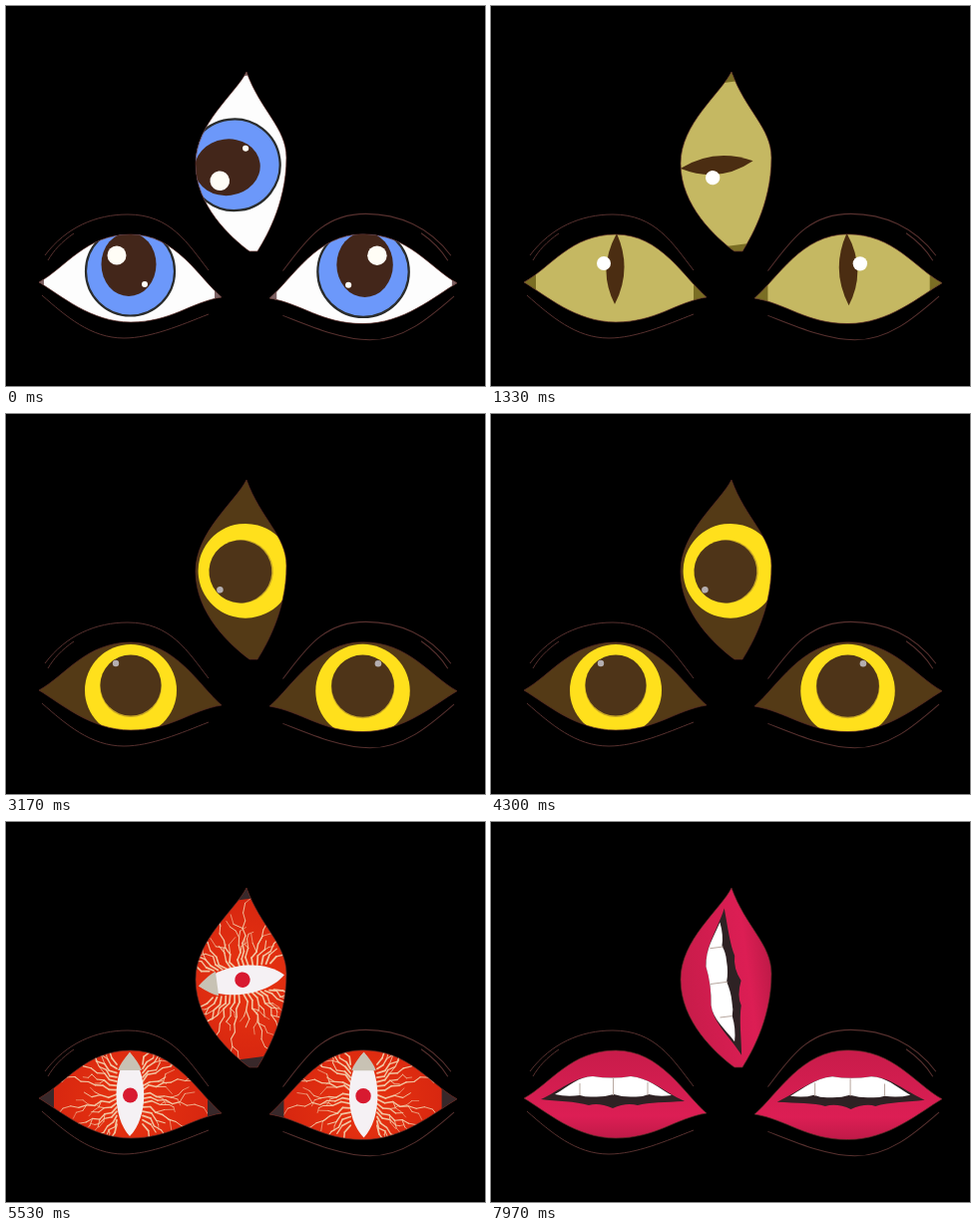
An HTML page for the animation above (8000 ms loop, 480 by 381 pixels).

```html
<!DOCTYPE html>
<html lang="en">
<head>
<meta charset="utf-8">
<title>Three eyes</title>
<style>
  html, body { margin: 0; height: 100%; overflow: hidden; background: #000; }
  svg { display: block; width: 100vw; height: 100vh; }
  .line { fill: none; stroke: #56302e; stroke-width: 1; }
  .rim { fill: none; stroke: #5a2a26; stroke-width: .7; }
</style>
</head>
<body>
<svg viewBox="0 0 480 381">
  <defs>
    <clipPath id="sideClip"><path class="sideLid"/></clipPath>
    <clipPath id="browClip"><path class="browLid"/></clipPath>
    <radialGradient id="redBall" gradientUnits="userSpaceOnUse" cx="124" cy="280" r="95">
      <stop offset="0" stop-color="#e83410"/><stop offset="1" stop-color="#d42410"/>
    </radialGradient>
    <linearGradient id="lipShade" gradientUnits="userSpaceOnUse" x1="0" y1="229" x2="0" y2="317">
      <stop offset="0" stop-color="#c81c4a"/><stop offset=".75" stop-color="#dc1e54"/><stop offset="1" stop-color="#c01a48"/>
    </linearGradient>

    <!-- Contents are drawn for the left eye and reused for the others -->
    <g id="blue">
      <rect x="20" y="200" width="210" height="140" fill="#fdfdfd"/>
      <path d="M20 200H38V340H20ZM209 200H230V340H209Z" fill="#7c6264"/>
      <circle cx="124.5" cy="266" r="44.5" fill="#6c98fa" stroke="#2a2c2c" stroke-width="2.2"/>
      <ellipse cx="123" cy="259" rx="27.5" ry="32" fill="#43261a"/>
      <circle cx="111" cy="250" r="9.5" fill="#fffdf6"/>
      <circle cx="139" cy="279" r="3" fill="#fffdf6"/>
    </g>
    <g id="cat">
      <rect x="20" y="200" width="210" height="140" fill="#c5b862"/>
      <path d="M20 200H45V340H20ZM203 200H230V340H203Z" fill="#7a6e24"/>
      <path d="M126 228Q142 264 124 299Q106 264 126 228Z" fill="#4b2d12"/>
      <circle cx="113" cy="258" r="7" fill="#fff"/>
    </g>
    <g id="ring">
      <rect x="20" y="200" width="210" height="140" fill="#543a16"/>
      <circle cx="125" cy="277" r="46" fill="#ffe01c"/>
      <circle cx="125" cy="273" r="31" fill="#c9a824"/>
      <circle cx="125" cy="272" r="30.5" fill="#4e3418"/>
      <circle cx="110" cy="250" r="3.2" fill="#b4aeb0"/>
    </g>
    <g id="red">
      <rect x="20" y="200" width="210" height="140" fill="url(#redBall)"/>
      <g id="veins" fill="none" stroke="#f2c4a0" stroke-linejoin="round" stroke-linecap="round"></g>
      <path d="M20 200H48V340H20ZM202 200H230V340H202Z" fill="#38282a"/>
      <path d="M124 231C143 252 143 296 124 315C106 296 106 252 124 231Z" fill="#f5f1f4"/>
      <path d="M124 231Q133 241 136 249H112Q115 241 124 231Z" fill="#c8c2b4"/>
      <circle cx="124.5" cy="274" r="7.5" fill="#d81a30"/>
    </g>
    <g id="lips">
      <rect x="20" y="200" width="210" height="140" fill="url(#lipShade)"/>
      <path d="M50 278C68 270 84 255 102 255Q122 258 140 255C160 257 173 270 194 280C175 281 158 281 147 284Q135 281 122 287Q108 281 98 284C85 280 65 280 50 278Z" fill="#2e2224"/>
      <path d="M64 273C78 265 88 255 102 255Q122 258 140 255C158 257 167 266 181 274Q168 276 158 273Q151 276 143 275.500Q132 276 123 273Q112 276 103 275.500Q95 276 89 274Q76 276 64 273Z" fill="#fff"/>
      <path d="M89 262V274M122.500 257V274M157 261V274" stroke="#b8a8a0" stroke-width="1"/>
    </g>

    <g id="sideEye">
      <path class="line" id="crease"/>
      <path class="line" id="fold"/>
      <path class="line" id="under"/>
      <g clip-path="url(#sideClip)"><use class="ball"/></g>
      <path class="rim sideLid"/>
    </g>
  </defs>

  <rect width="480" height="381"/>
  <use href="#sideEye"/>
  <use href="#sideEye" transform="matrix(-1.027 0 0 1.02 485.9 -4.8)"/>
  <path class="line" id="browFolds" d="M238 243C213 217 195 180 205 135M214 95L225 82M274 73Q286 91 294 115"/>
  <g clip-path="url(#browClip)">
    <g transform="translate(235 159) rotate(-97.500) scale(1.03) translate(-124 -272)"><use class="ball"/></g>
  </g>
  <path class="rim browLid"/>
</svg>
<script>
const LOOP = 8000, PERIOD = 2070, FIRST_BLINK = 333;
const SCENES = ['blue', 'cat', 'ring', 'red', 'lips'];

// Each shape has three poses: open, nearly shut, shut
const POSES = {
  '.sideLid': [
    'M33 277C60 262 80 229 125 229C170 229 193 272 216 292C185 297 165 317 125 317C85 317 55 290 33 277Z',
    'M34 286C65 285 95 284 125 285C160 286 190 296 214 299C185 304 165 316 125 316C85 316 55 301 34 286Z',
    'M36 292C60 306 85 317 125 317C165 317 190 306 213 302C190 306 165 317 125 317C85 317 60 306 36 292Z'],
  '.browLid': [
    'M241 66C230 88 190 118 190 158C190 200 225 232 244 246L252 246C258 236 281 200 281 152C281 122 255 105 241 66Z',
    'M250 84C246 110 247 130 248 158C249 190 252 220 256 243L258 243C270 220 280 195 280 155C280 128 270 120 250 84Z',
    'M257 95C272 120 279 130 279 158C279 195 268 222 260 240L260 240C268 222 279 195 279 158C279 130 272 120 257 95Z'],
  '#crease': [
    'M39 250C60 222 90 209 122 209C165 209 182 238 203 265',
    'M42 256C66 234 95 221 122 221C170 222 174 240 200 271',
    'M43 260C66 240 95 229 122 229C166 230 176 248 199 275'],
  '#fold': [
    'M42 255C48 245 55 237 68 228',
    'M43 266C75 242 112 232 151 245',
    'M43 272C75 252 112 243 155 254'],
  '#under': [
    'M36 290C60 311 85 333 118 333C145 333 175 320 203 309',
    'M40 302C65 320 95 339 128 339C155 339 175 330 201 318',
    'M41 306C65 323 95 342 128 342C155 342 175 333 201 321']
};

const $$ = selector => document.querySelectorAll(selector);

function blend(poses, level) {
  const from = Math.min(1, Math.floor(level)), k = level - from;
  const next = poses[from + 1].match(/[\d.]+/g);
  let i = 0;
  return poses[from].replace(/[\d.]+/g, n => (+n + (next[i++] - n) * k).toFixed(2));
}

function drawVeins() {
  let seed = 11, markup = '';
  const random = () => (seed = seed * 16807 % 2147483647) / 2147483647;
  const vein = (x, y, angle, length, width) => {
    const steps = Math.max(2, Math.round(length / 8));
    let previous = `${x} ${y}`;
    for (let i = 0; i < steps; i++) {
      const bend = angle + (i % 2 ? 1 : -1) * (0.1 + random() * 0.4);
      x += Math.cos(bend) * length / steps;
      y += Math.sin(bend) * length / steps;
      const point = `${x.toFixed(1)} ${y.toFixed(1)}`;
      const taper = (width * (1 - 0.6 * i / steps)).toFixed(2);
      markup += `<path d="M${previous}L${point}" stroke-width="${taper}"/>`;
      previous = point;
      if (width > 1 && i > 0 && random() < 0.5)
        vein(x, y, angle + (random() < 0.5 ? -0.6 : 0.6), length * 0.35, 0.9);
    }
  };
  for (let i = 0; i < 30; i++) {
    const side = i % 2 ? 1 : -1;
    const spread = ((i >> 1) - 7) / 7;
    const angle = spread * 1.05 + (random() - 0.5) * 0.15;
    const length = (i % 4 < 2 ? 62 : 34) * (1 - 0.45 * Math.abs(spread)) * (0.75 + random() * 0.4);
    vein(124 + side * 13, 273 + spread * 30, side > 0 ? angle : Math.PI - angle, length, 1.7);
  }
  document.getElementById('veins').innerHTML = markup;
}

// 0 = open, 1 = nearly shut, 2 = shut
function lidLevel(u) {
  if (u < 127) return (u / 127) ** 1.5;
  if (u < 200) return 1 + (u - 127) / 73;
  if (u < 260) return 2;
  if (u < 480) return 2 * (1 - (u - 260) / 220) ** 2;
  return 0;
}

function render(t) {
  const sinceBlink = (t - FIRST_BLINK + PERIOD) % PERIOD;
  const level = lidLevel(sinceBlink);
  const scene = SCENES[Math.floor((t - FIRST_BLINK - 230) / PERIOD) + 1];
  for (const selector in POSES) {
    const d = blend(POSES[selector], level);
    $$(selector).forEach(path => path.setAttribute('d', d));
  }
  $$('.ball').forEach(ball => {
    ball.setAttribute('href', '#' + scene);
    ball.setAttribute('y', 9 * Math.min(1, level));
  });
  document.getElementById('browFolds').style.opacity = Math.min(1, level);
}

drawVeins();
const start = performance.now();
(function tick() {
  render((performance.now() - start) % LOOP);
  requestAnimationFrame(tick);
})();
</script>
</body>
</html>
```
